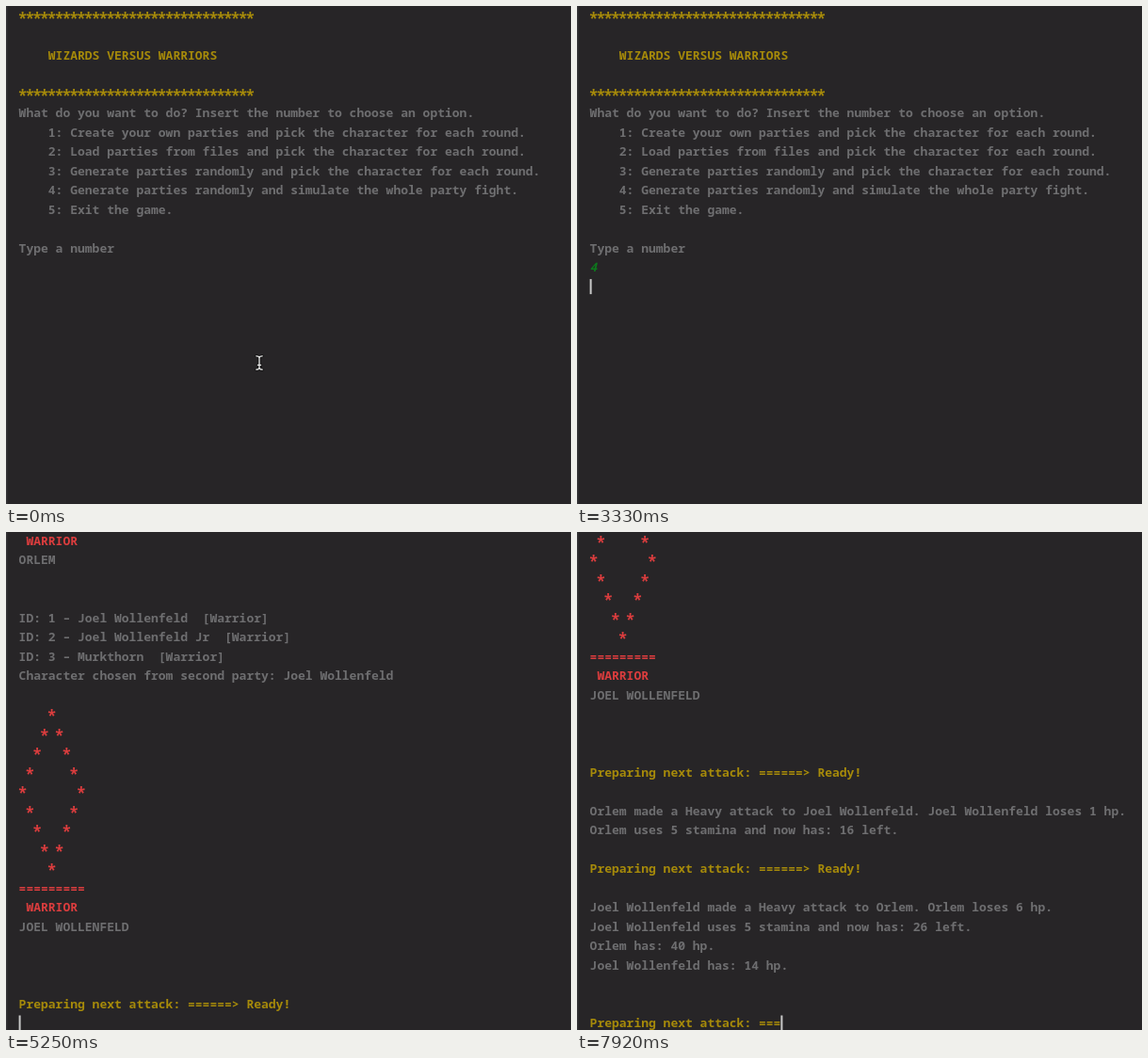
Animation of 600 by 529 pixels, one loop 8000 ms. Source, as an HTML page:

```html
<!DOCTYPE html>
<html lang="en">
<head>
<meta charset="utf-8">
<title>Wizards versus Warriors</title>
<style>
  html, body { margin: 0; width: 100%; height: 100%; overflow: hidden; background: #272527; }
  svg { display: block; width: 600px; height: 529px; }
  text { font: 700 13px "Noto Sans Mono", "DejaVu Sans Mono", monospace; white-space: pre; font-variant-ligatures: none; }
  /* larger asterisks on the same 7.8px character grid */
  .stars { font-size: 17px; letter-spacing: -2.4px; transform: translate(-1.2px, 4.2px); }
  .grey { fill: #6e6e70; }
  .gold { fill: #a68a0a; }
  .red { fill: #dc3d3e; }
  .input { fill: #0c7a1c; font-style: italic; }
</style>
</head>
<body>
<svg viewBox="0 0 600 529">
  <defs>
    <path id="beam" d="M-3.2-7.2Q-.4-7.2 0-5.4Q.4-7.2 3.2-7.2M0-5.4V5.4M-3.2 7.2Q-.4 7.2 0 5.4Q.4 7.2 3.2 7.2M-1.6 2.4H1.6"/>
  </defs>
  <rect width="600" height="529" fill="#272527"/>
  <rect width="1.5" height="529" fill="#353437"/>
  <g id="screen"></g>
  <rect id="caret" width="2" height="16" fill="#c9c9c9"/>
  <g id="mouse" fill="none" stroke-linecap="round">
    <use href="#beam" stroke="#111" stroke-width="3"/>
    <use href="#beam" stroke="#eee" stroke-width="1.3"/>
  </g>
</svg>
<script>
const LOOP = 8000, TICK = 1000 / 12;
const LEFT = 13.6, CHAR = 7.8, PITCH = 20.5, FIRST = 15.6, LAST = 526, ROWS = 26;
const HERO = "Orlem", RIVAL = "Joel Wollenfeld";

const screen = document.getElementById("screen");
const caret = document.getElementById("caret");
const mouse = document.getElementById("mouse");

const row = (style, text = "") => ({ style, text });
const rows = (style, ...texts) => texts.map(text => row(style, text));
const blank = n => Array.from({ length: n }, () => row("grey"));

const stars = "*".repeat(32);
const menu = [
  row("gold stars", stars),
  ...rows("gold", "", "    WIZARDS VERSUS WARRIORS", ""),
  row("gold stars", stars),
  ...rows("grey",
    "What do you want to do? Insert the number to choose an option.",
    "    1: Create your own parties and pick the character for each round.",
    "    2: Load parties from files and pick the character for each round.",
    "    3: Generate parties randomly and pick the character for each round.",
    "    4: Generate parties randomly and simulate the whole party fight.",
    "    5: Exit the game.", "", "Type a number")
];

const diamond = Array.from({ length: 9 }, (_, i) => {
  const half = 4 - Math.abs(i - 4);
  return " ".repeat(4 - half) + "*" + (half ? " ".repeat(2 * half - 1) + "*" : "");
});
const badge = name => [...rows("red", "=".repeat(9), " WARRIOR"), row("grey", name.toUpperCase())];

const intro = [
  ...badge(HERO), ...blank(2),
  ...rows("grey",
    `ID: 1 – ${RIVAL}  [Warrior]`,
    `ID: 2 – ${RIVAL} Jr  [Warrior]`,
    "ID: 3 – Murkthorn  [Warrior]",
    `Character chosen from second party: ${RIVAL}`, ""),
  ...rows("red stars", ...diamond), ...badge(RIVAL), ...blank(3)
];

const rounds = [
  { start: 3500, before: intro },
  { start: 5420, before: rows("grey", "",
    `${HERO} made a Heavy attack to ${RIVAL}. ${RIVAL} loses 1 hp.`,
    `${HERO} uses 5 stamina and now has: 16 left.`, "") },
  { start: 7330, before: rows("grey", "",
    `${RIVAL} made a Heavy attack to ${HERO}. ${HERO} loses 6 hp.`,
    `${RIVAL} uses 5 stamina and now has: 26 left.`,
    `${HERO} has: 40 hp.`, `${RIVAL} has: 14 hp.`, "", "") }
];

// Console contents; the last row always holds the caret.
function consoleRows(t) {
  if (t < 2580) return [...menu, row("input")];
  if (t < 3330) return [...menu, row("input", "4")];
  if (t < 3500) return [...menu, row("input", "4"), row("grey")];
  const out = [];
  let ready = false;
  for (const { start, before } of rounds) {
    if (t < start) break;
    const bars = Math.floor((t - start) / 250) + 1;
    ready = bars > 6;
    out.push(...before, row("gold", "Preparing next attack: " + "=".repeat(Math.min(bars, 6)) + (ready ? "> Ready!" : "")));
  }
  return ready ? [...out, row("grey")] : out;
}

function caretOn(t) {
  if (t < 2580) return (t + 250) % 1000 >= 500;
  return t < 3250 || t >= 3330;
}

// time, x, y
const path = [
  [333, 269, 379], [583, 367, 431], [1000, 367, 431], [1833, 125, 260],
  [2000, 114, 304], [2250, 105, 286]
];
function mouseAt(t) {
  const i = path.findIndex(p => p[0] > t);
  if (i === 0) return path[0].slice(1);
  if (i < 0) return path[path.length - 1].slice(1);
  const [t0, x0, y0] = path[i - 1], [t1, x1, y1] = path[i];
  const u = (t - t0) / (t1 - t0), e = u * u * (3 - 2 * u);
  return [x0 + (x1 - x0) * e, y0 + (y1 - y0) * e];
}

let shown = "";
function drawRows(list, top) {
  const key = list.map(r => r.text).join("\n");
  if (key === shown) return;
  shown = key;
  screen.replaceChildren(...list.map(({ style, text }, i) => {
    const el = document.createElementNS("http://www.w3.org/2000/svg", "text");
    el.setAttribute("class", style);
    el.setAttribute("x", LEFT);
    el.setAttribute("y", top + i * PITCH);
    el.textContent = text;
    return el;
  }));
}

function draw(t) {
  const list = consoleRows(t).slice(-ROWS), last = list.length - 1;
  const top = t < 3500 ? FIRST : LAST - last * PITCH;
  drawRows(list, top);
  caret.setAttribute("x", LEFT + list[last].text.length * CHAR);
  caret.setAttribute("y", top + last * PITCH - 12.5);
  caret.setAttribute("visibility", caretOn(t) ? "visible" : "hidden");
  const [x, y] = mouseAt(Math.floor((t + 4) / TICK) * TICK);
  mouse.setAttribute("transform", `translate(${x} ${y})`);
  mouse.setAttribute("visibility", t < 2580 ? "visible" : "hidden");
}

const begin = performance.now();
function frame() {
  draw((performance.now() - begin) % LOOP);
  requestAnimationFrame(frame);
}
frame();
</script>
</body>
</html>
```
